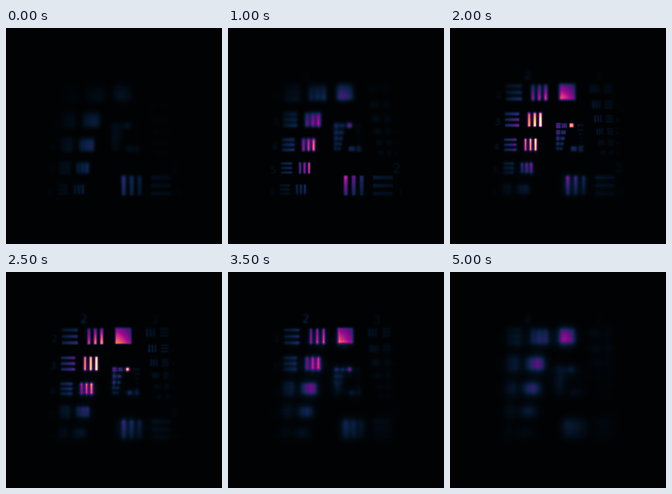
A matplotlib script for the animation above (5.5 s loop, 271 px wide and 270 px high).

```python
import numpy as np
import matplotlib.pyplot as plt
from matplotlib.animation import FuncAnimation
from matplotlib.colors import LinearSegmentedColormap
from matplotlib.path import Path
from matplotlib.textpath import TextPath

W, H = 271, 270
FRAMES, INTERVAL = 11, 500
SHRINK = 2 ** (-1 / 6)  # size ratio of successive chart elements
Y, X = np.mgrid[0:H, 0:W] + 0.5

GLOW = LinearSegmentedColormap.from_list("glow", [
    (0.00, "#010203"), (0.08, "#030f1c"), (0.18, "#0a2145"),
    (0.27, "#2a2068"), (0.36, "#62107f"), (0.47, "#a00a90"),
    (0.60, "#e8486a"), (0.72, "#ff8a4a"), (0.85, "#ffd070"),
    (1.00, "#fffbe0")], N=512)

mask = np.zeros((H, W))


def span(v, a, b):
    """Antialiased coverage of the interval a..b."""
    return np.clip(np.minimum(v + .5, b) - np.maximum(v - .5, a), 0, 1)


def rect(x, y, w, h, tone=1):
    cover = tone * span(X, x, x + w) * span(Y, y, y + h)
    np.maximum(mask, cover, out=mask)


def bars(cx, cy, size, vertical):
    """Three bars with equal gaps; very thin ones pass less light."""
    x, y, u = cx - size / 2, cy - size / 2, size / 5
    tone = min(1, u / 2)
    for k in (0, 2, 4):
        if vertical:
            rect(x + k * u, y, u, size, tone)
        else:
            rect(x, y + k * u, size, u, tone)


def digit(char, cx, cy, height):
    """Digit of the given height centred on a point."""
    text = TextPath((0, 0), str(char), size=height / .73)
    box = text.get_extents()
    mx, my = (box.x0 + box.x1) / 2, (box.y0 + box.y1) / 2
    cover = np.zeros((H, W))
    shifts = (-1 / 3, 0, 1 / 3)
    for sx in shifts:
        for sy in shifts:
            pts = np.column_stack([(X + sx - cx + mx).ravel(),
                                   (cy - Y - sy + my).ravel()])
            inside = np.zeros(len(pts), bool)
            for poly in text.to_polygons():
                inside ^= Path(poly).contains_points(pts)
            cover += inside.reshape(H, W) / 9
    np.maximum(mask, cover, out=mask)


def column(count, x, y, lean, size, step, ratio):
    """Yield index, x, y and size of elements shrinking down a column."""
    for n in range(count):
        yield n, x + lean * n, y, size * SHRINK ** n
        y += step * ratio ** n


def draw_chart():
    rect(137, 69.5, 20.5, 20.5)
    digit(2, 97.5, 58, 11)
    digit(3, 187, 59, 11)
    digit(2, 211.5, 175, 12)

    for n, x, y, size in column(5, 80, 80.5, -2.2, 20, 34, .925):
        bars(x, y, size, False)
        bars(x + 1.6 * size, y, size, True)
        digit(n + 2, 61 - 1.4 * n, y + 2.5, 8.5)
    bars(157.8, 197, 25, True)
    bars(194.5, 197, 25, False)
    digit(1, 217, 205, 9)

    for n, x, y, size in column(6, 181.5, 75.5, 2.1, 11, 20, SHRINK):
        bars(x, y, size, True)
        bars(198.5 + .8 * n, y, size, False)
        digit(n + 1, 209.5 + .2 * n, y + 1.5, 4)

    rect(150, 119, 5.2, 5.2)
    for n, x, y, size in column(5, 136, 122, -.3, 5.8, 8.5, SHRINK):
        bars(x, y, size, False)
        bars(x + 1.3 * size, y, size, True)
    bars(155.5, 151, 6.5, True)
    bars(164.5, 151, 6.5, False)
    for n, x, y, size in column(6, 161.5, 121.5, .5, 3.4, 6, SHRINK):
        bars(x, y, size, True)
        bars(x + 1.3 * size, y, size, False)


draw_chart()

FREQ2 = np.fft.fftfreq(H)[:, None] ** 2 + np.fft.fftfreq(W)[None, :] ** 2
FIELD = np.fft.fft2(np.sqrt(mask))
LIGHT = (1.2 * np.exp(-((X - 126) / 26) ** 2 / 2 - ((Y - 138) / 46) ** 2 / 2)
         + .13 * np.exp(-((Y - 135) / 100) ** 2))


def gauss(sigma):
    return np.exp(-2 * np.pi ** 2 * sigma ** 2 * FREQ2)


def defocus(d):
    """Chart at signed distance d from focus: fringes, softening and halo."""
    late, a = d < 0, abs(d)
    fringe, soften, fade = (.2, .011, 350) if late else (.06, .024, 130)
    wave = np.fft.ifft2(FIELD * np.exp(1j * np.pi * FREQ2 * a * fringe))
    haze = .6 * (1 - np.exp(-(a / 80) ** 2)) if late else 0
    blur = (1 - haze) * gauss(.6 + a * soften) + haze * gauss(6)
    out = np.fft.ifft2(np.fft.fft2(np.abs(wave) ** 2) * blur).real
    return np.clip(out, 0, None) * np.exp(-(a / fade) ** 2)


STEP, NEAR = 15, -330
STACK = np.array([defocus(d) for d in range(NEAR, 256, STEP)])
ROWS = np.arange(H)


def render(i):
    """The chart is tilted, so the focal plane sweeps upward over its rows."""
    t = i * INTERVAL / 1000
    focus_row = 236 - 57 * t
    level = np.clip((focus_row - ROWS - NEAR) / STEP, 0, len(STACK) - 1.001)
    low = level.astype(int)
    part = (level - low)[:, None]
    view = STACK[low, ROWS] * (1 - part) + STACK[low + 1, ROWS] * part
    gain = min(1, .72 + .2 * t)
    return GLOW(np.clip(view * LIGHT * gain, 0, 1))[..., :3]


fig = plt.figure(figsize=(W / 100, H / 100), dpi=100, facecolor="black")
ax = fig.add_axes([0, 0, 1, 1])
ax.axis("off")
image = ax.imshow(render(0), interpolation="nearest", aspect="auto")


def update(i):
    image.set_data(render(i))
    return [image]


anim = FuncAnimation(fig, update, frames=FRAMES, interval=INTERVAL,
                     repeat=True, repeat_delay=0, blit=False)
plt.show()
```
